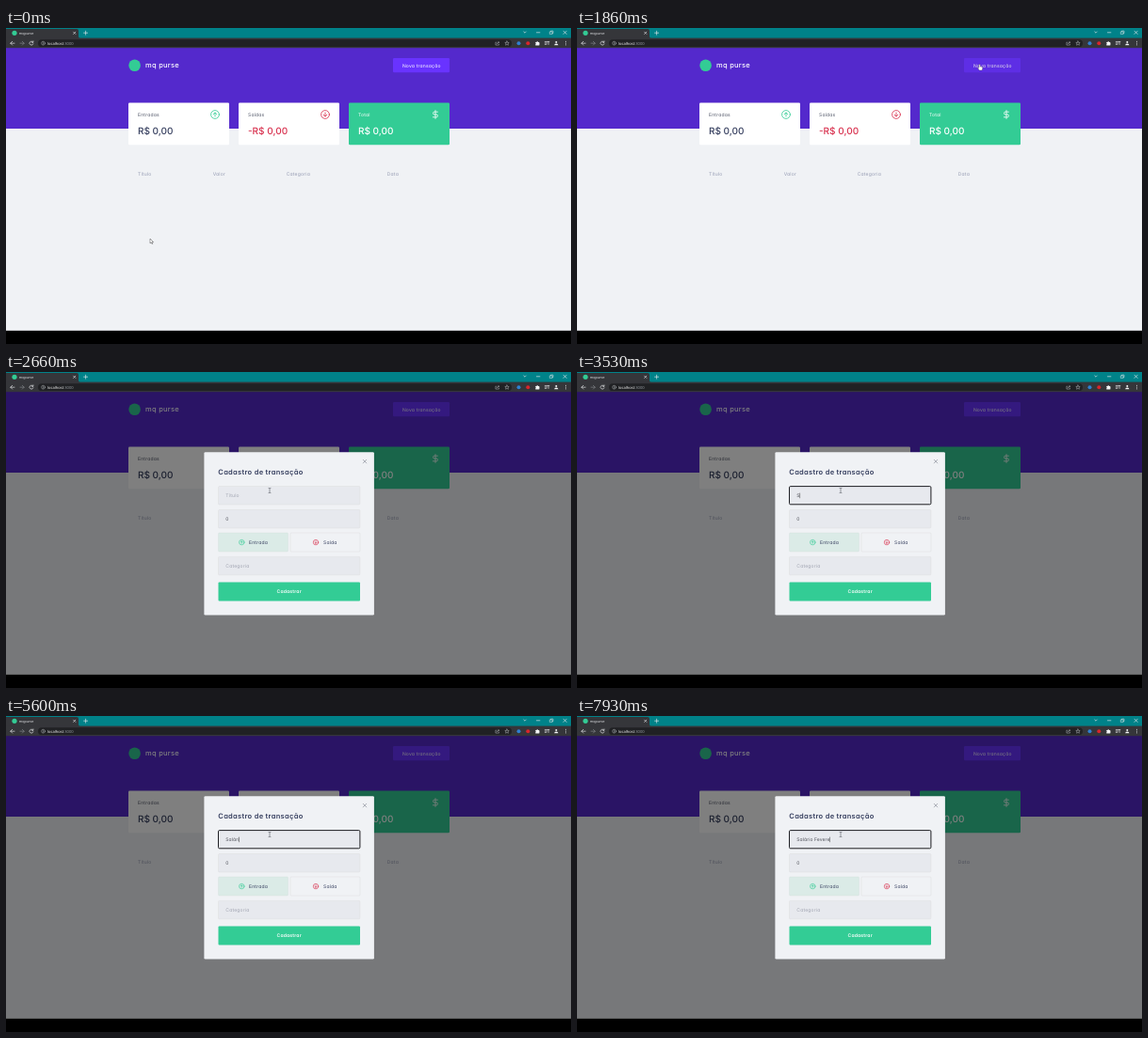
These frames come from a looping animation (600 by 336 pixels, 8 s). An HTML page:

```html
<!DOCTYPE html>
<html lang="pt-BR">
<head>
<meta charset="utf-8">
<title>Finance dashboard</title>
<style>
  html, body { margin: 0; width: 100%; height: 100%; overflow: hidden; background: #000; }
  svg { display: block; width: 100%; height: 100%; }
  text {
    font: 400 5px Inter, "Open Sans", sans-serif;
    font-feature-settings: "cv11";
    letter-spacing: .2px;
    text-rendering: geometricPrecision;
    white-space: pre;
  }
  .ui { font: 4.1px "Open Sans", "Noto Sans", sans-serif; letter-spacing: 0; }
  .tab { font-size: 3.7px; }
  .brand { font-size: 7.5px; font-weight: 500; letter-spacing: .28px; }
  .money { font-size: 10px; font-weight: 500; letter-spacing: 0; }
  .title { font-size: 7.5px; font-weight: 600; letter-spacing: .31px; }
  .strong { font-weight: 600; }
  .muted { fill: #969cb3; }
  .hint { fill: #a2a5b2; }
  .ink { fill: #363f5f; }
  .typed { fill: #50525a; letter-spacing: .08px; }
  .line { fill: none; stroke-linecap: round; stroke-linejoin: round; }
  .field { fill: #e7e9ee; stroke: #d7d7d7; stroke-width: .35; }
</style>
</head>
<body>
<svg id="stage" viewBox="0 0 600 336" preserveAspectRatio="none">
  <defs>
    <g id="ring" class="line"><circle r="4.4"/><path d="M0 2V-2M-1.8-.2 0-2 1.8-.2"/></g>
  </defs>

  <!-- page -->
  <rect y="21" width="600" height="301" fill="#f0f2f5"/>
  <rect y="21" width="600" height="86" fill="#5429cc"/>
  <circle cx="136.6" cy="39.7" r="6.3" fill="#33cc95"/>
  <text class="brand" x="148" y="42.2" fill="#fff">mq purse</text>
  <rect x="411" y="32" width="60" height="15.3" rx="1.2" fill="#6933ff"/>
  <text x="420.9" y="41.6" fill="#fff">Nova transação</text>
  <rect id="hover" x="411" y="32" width="60" height="15.3" rx="1.2"/>
  <g id="cards"></g>
  <g id="heads"></g>

  <!-- dialog -->
  <g id="dialog">
    <rect y="21" width="600" height="301" opacity=".5"/>
    <rect x="210.4" y="85.2" width="180.5" height="173.4" rx="1.4" fill="#f0f2f5"/>
    <path class="line" d="M379.2 93.3l3.6 3.6m0-3.6l-3.6 3.6" stroke="#7d818e" stroke-width=".6"/>
    <text class="title ink" x="225.3" y="108.6">Cadastro de transação</text>
    <g id="fields"></g>
    <rect x="225.5" y="171" width="74" height="20" rx="1" fill="#dbebe7" stroke="#d0dcda" stroke-width=".35"/>
    <rect x="302" y="171" width="74" height="20" rx="1" fill="none" stroke="#d7d7d7" stroke-width=".35"/>
    <use href="#ring" transform="translate(250.3 181.1) scale(.62)" stroke="#33cc95"/>
    <use href="#ring" transform="translate(329 181.1) scale(.62 -.62)" stroke="#d8324f"/>
    <text class="ink" x="258" y="182.9">Entrada</text>
    <text class="ink" x="337" y="182.9">Saída</text>
    <text class="hint" id="titleHint" x="233.3" y="133.2">Título</text>
    <text class="typed" x="233.3" y="158">0</text>
    <text class="hint" x="233.3" y="207.9">Categoria</text>
    <g id="focus">
      <rect x="225.5" y="121.6" width="150.4" height="19.2" rx="1.2" fill="none" stroke="#15161a" stroke-width=".95"/>
      <text class="typed" id="typed" x="233.3" y="133.2"></text>
      <rect id="caret" y="128.6" width=".45" height="5.6" fill="#222"/>
    </g>
    <rect x="225.5" y="223.5" width="150.5" height="20" rx="1" fill="#33cc95"/>
    <text class="strong" x="300.7" y="235.4" text-anchor="middle" fill="#fff">Cadastrar</text>
  </g>

  <!-- browser -->
  <rect width="600" height="11" fill="#008289"/>
  <path d="M0 11V1H75Q77 1 77 3V9Q77 11 79 11Z" fill="#35363a"/>
  <rect y="10.6" width="600" height="10.6" fill="#35363a"/>
  <rect x="34" y="12.3" width="503" height="7.8" rx="3.9" fill="#202124"/>
  <circle cx="9" cy="5.3" r="2.6" fill="#33cc95"/>
  <text class="ui tab" x="13.8" y="6.6" fill="#e8eaed">mqpurse</text>
  <text class="ui" x="44" y="17.7" fill="#fff">localhost<tspan fill="#9aa0a6">:3000</tspan></text>
  <g class="line" stroke="#e8eaed" stroke-width=".65">
    <path d="M71.6 4.2l2.2 2.2m0-2.2l-2.2 2.2M84.6 3.2v4m-2-2h4"/>
    <path d="M549.8 4l1.2 1.2 1.2-1.2M563.5 4.8h3.4M592 3.2l3.2 3.2m0-3.2l-3.2 3.2"/>
    <path d="M577.7 3.9h2.5v2.5h-2.5zM578.5 3.9v-.8h2.5v2.5h-.8" stroke-width=".5"/>
    <path d="M9 16.2H4.8m1.9-1.9-1.9 1.9 1.9 1.9"/>
    <path d="M15 16.2h4.2m-1.9-1.9 1.9 1.9-1.9 1.9" stroke="#85888d"/>
    <path d="M28.5 14.8a2 2 0 1 0 .4 2M28.9 13.9v1.4h-1.5"/>
    <g stroke="#b5b8bd" stroke-width=".5">
      <circle cx="39.5" cy="16.2" r="1.9"/><path d="M39.5 16v1.1m0-2v.05"/>
      <path d="M520.6 15.2h-.7v2.9h3.6v-.9M521.2 16.8q.2-1.6 2.3-1.6m-.8-1 1 1-1 1"/>
      <path d="M532 14l.65 1.45 1.55.15-1.2 1.05.4 1.6-1.4-.85-1.4.85.4-1.6-1.2-1.05 1.55-.15z"/>
    </g>
    <path d="M572.3 14.6h3.2m-3.2 1.4h2.2m-2.2 1.4h1.6m2.2-2.8v2.9m0-2.9h.8"/>
    <path d="M594.5 14.3v.05m0 1.75v.05m0 1.75v.05" stroke-width=".9"/>
  </g>
  <circle cx="544.5" cy="16.2" r="2" fill="#2f80d0"/>
  <circle cx="554.3" cy="16.2" r="2" fill="#d8262c"/>
  <path d="M562.3 15h1.2a.8.8 0 0 1 1.6 0h1.2v1.2a.8.8 0 0 1 0 1.4v.9h-4v-1.2a.7.7 0 0 0 0-1.2z" fill="#f1f3f4"/>
  <circle cx="584.3" cy="15.1" r="1" fill="#f1f3f4"/>
  <path d="M582.2 18.3q0-1.7 2.1-1.7t2.1 1.7z" fill="#f1f3f4"/>
  <rect y="321.8" width="600" height="14.2"/>

  <!-- pointers -->
  <g id="pointer">
    <path id="arrow" d="M0 0V5L1.2 3.9 2 5.7 2.8 5.3 2 3.6H3.6Z" fill="#fff" stroke="#222" stroke-width=".4"/>
    <path id="hand" d="M-.6.4Q0-.4.5.4V2.4L2.9 3Q3.4 3.2 3.3 3.8L2.7 6.4H-.2L-2 3.9Q-1.9 3-.6 4Z" fill="#fff" stroke="#222" stroke-width=".3"/>
    <path id="beam" class="line" d="M-1-2.6Q0-2.6 0-2 0-2.6 1-2.6M0-2V2M-1 2.6Q0 2.6 0 2 0 2.6 1 2.6" stroke="#50535b" stroke-width=".55"/>
  </g>
</svg>
<script>
const $ = id => document.getElementById(id);
const show = (id, on) => $(id).setAttribute('display', on ? 'inline' : 'none');
const LOOP = 8000, OPEN = 1900, FOCUS = 2950;
const PHRASE = 'Salário Fevere';
const KEYS = [3480, 3860, 4280, 4680, 5030, 5340, 5650, 5950, 6280, 6640, 6980, 7290, 7590, 7850];

// time, x, y
const PATH = [
  [0, 153, 224], [250, 153, 224], [800, 159, 238], [1000, 159, 238],
  [1660, 427.5, 38.5], [2050, 427.5, 38.5], [2650, 280, 126], [LOOP, 280, 126]
];

function card(x, label, value, color, fill, ink, icon) {
  return `<rect x="${x}" y="79.5" width="107" height="44.8" rx="1.3" fill="${fill}"/>
    <text x="${x + 10}" y="93.8" fill="${ink}">${label}</text>
    <text class="money" x="${x + 10}" y="113.1" fill="${color}">${value}</text>
    <g class="line" transform="translate(${x + 92} 92)" stroke="${color}" stroke-width=".8">${icon}</g>`;
}
const up = '<use href="#ring" stroke="#33cc95"/>';
const down = '<use href="#ring" transform="scale(1 -1)"/>';
const dollar = '<path d="M0-4.4V4.4M2.4-2.8H-1.1a1.4 1.4 0 0 0 0 2.8H1.1a1.4 1.4 0 0 1 0 2.8H-2.6"/>';
$('cards').innerHTML =
  card(130, 'Entradas', 'R$ 0,00', '#363f5f', '#fff', '#555a6b', up) +
  card(247, 'Saídas', '-R$ 0,00', '#d8304e', '#fff', '#555a6b', down) +
  card(364, 'Total', 'R$ 0,00', '#fff', '#33cc95', '#fff', dollar);
$('heads').innerHTML = [['Título', 140], ['Valor', 219.7], ['Categoria', 297.7], ['Data', 404.8]]
  .map(([s, x]) => `<text class="muted" x="${x}" y="157.2">${s}</text>`).join('');
$('fields').innerHTML = [121.5, 146.5, 196.4]
  .map(y => `<rect class="field" x="225.5" y="${y}" width="150.4" height="19.5" rx="1"/>`).join('');

const clamp = v => Math.max(0, Math.min(1, v));
const ease = p => p * p * (3 - 2 * p);
const inside = (x, y, l, t, r, b) => x >= l && x <= r && y >= t && y <= b;

function pointerAt(t) {
  const i = Math.max(1, PATH.findIndex(p => p[0] > t));
  const [a, ax, ay] = PATH[i - 1], [b, bx, by] = PATH[i];
  const p = ease((t - a) / (b - a));
  return [ax + (bx - ax) * p, ay + (by - ay) * p];
}

function render(t) {
  const open = t >= OPEN, focused = t >= FOCUS;
  const [x, y] = pointerAt(t);
  const onButton = !open && inside(x, y, 411, 32, 471, 47.3);
  const onField = open && inside(x, y, 225.5, 121.5, 376, 141);

  $('pointer').setAttribute('transform', `translate(${x} ${y})`);
  show('hand', onButton);
  show('beam', onField);
  show('arrow', !onButton && !onField);
  const hover = open ? 1 - clamp((t - OPEN) / 200) : clamp((t - 1500) / 200);
  $('hover').setAttribute('opacity', .1 * hover);

  show('dialog', open);
  show('focus', focused);
  const count = KEYS.filter(k => k <= t).length;
  show('titleHint', !count);
  $('typed').textContent = PHRASE.slice(0, count);
  if (focused) {
    const last = count ? KEYS[count - 1] : FOCUS;
    const width = count ? $('typed').getComputedTextLength() : 0;
    $('caret').setAttribute('x', 233.3 + width);
    show('caret', (t - last) % 1000 < 500);
  }
}

const start = performance.now();
function tick() {
  render((performance.now() - start) % LOOP);
  requestAnimationFrame(tick);
}
tick();
</script>
</body>
</html>
```
